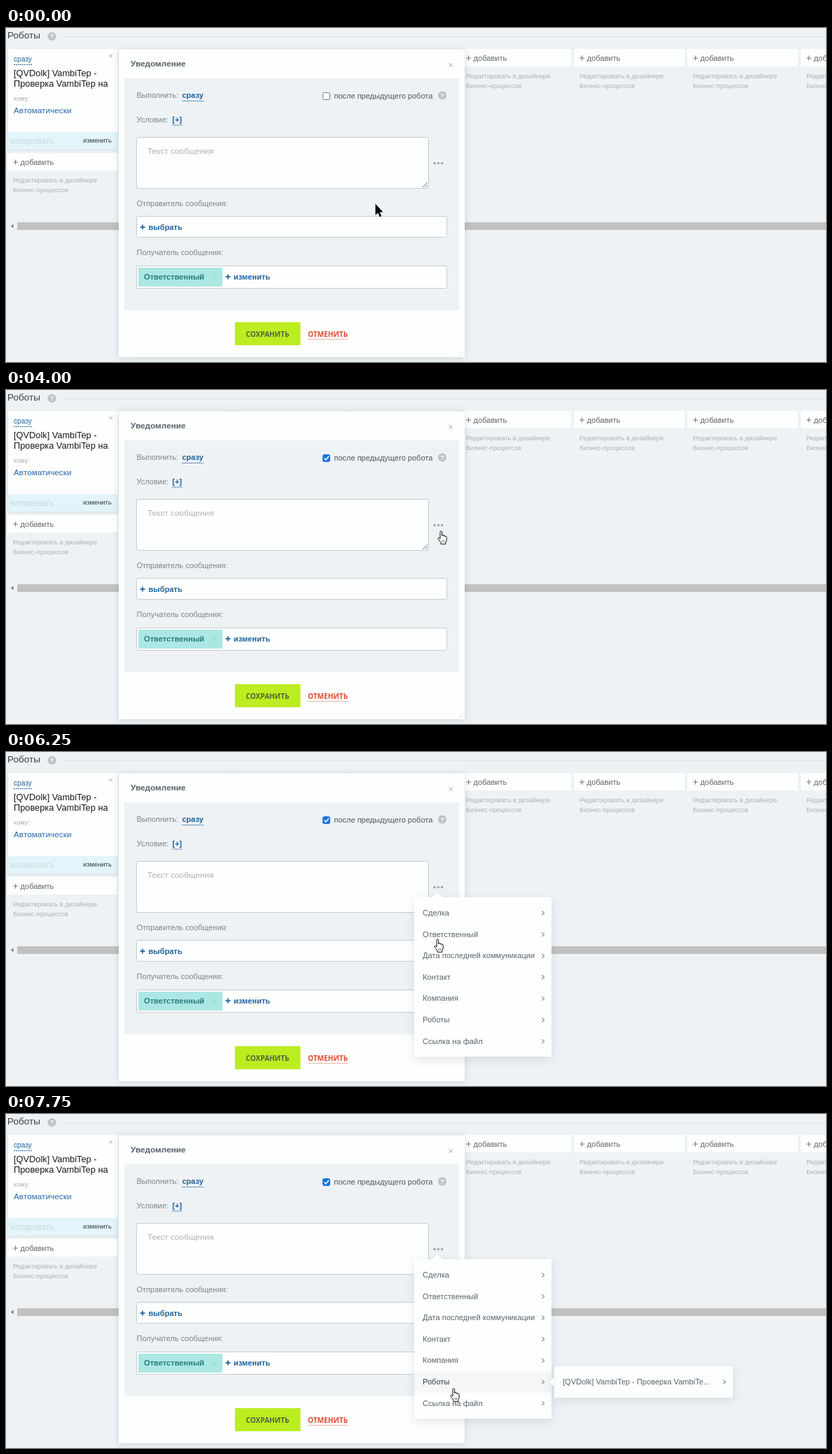
An HTML page with a canvas that plays this animation: 1171 by 478 pixels, repeating every 8 s.

```html
<!DOCTYPE html>
<html lang="ru">
<head>
<meta charset="utf-8">
<title>Роботы</title>
<style>
  html, body { margin: 0; width: 100%; height: 100%; overflow: hidden; background: #eef2f5; }
  canvas { display: block; }
</style>
</head>
<body>
<canvas id="stage" width="1171" height="478"></canvas>
<script>
const ctx = document.getElementById('stage').getContext('2d');
const LOOP = 8000;
const ARIAL = '"Liberation Sans", Arial, sans-serif';
const OPEN = '"Open Sans", sans-serif';
const BG = '#eef2f5', WHITE = '#fdfefe', MUTED = '#7d838a', LINK = '#1e629f', PALE = '#abb1b9';
const ITEM = '#5c646d';
const ITEMS = ['Сделка', 'Ответственный', 'Дата последней коммуникации', 'Контакт',
  'Компания', 'Роботы', 'Ссылка на файл'];

// start time, pointer kind, left, top
const POINTER = [
  [0, 'arrow', 527, 251], [250, 'beam', 511, 193], [500, 'arrow', 456, 138],
  [750, 'arrow', 448, 95], [1000, 'arrow', 455, 99], [1250, 'arrow', 456, 98],
  [3000, 'arrow', 488, 133], [3250, 'beam', 545, 163], [3500, 'hand', 600, 190],
  [3750, 'hand', 610, 203], [4000, 'hand', 616, 201], [4750, 'arrow', 611, 198],
  [6250, 'hand', 611, 267], [6500, 'hand', 620, 335], [6750, 'hand', 631, 391],
  [7750, 'hand', 634, 392]
];
// start time, then pairs of row and strength
const HOVER = [[0], [6500, 3, 0.6], [6750, 4, 0.5, 5, 0.4], [7000, 5, 1]];

const ARROW = new Path2D('M.5 .5V17L4.3 13.4 6.7 19.4 9.2 18.4 6.8 12.5H11.5Z');
const HAND = new Path2D('M4 12V2.2a1.3 1.3 0 0 1 2.6 0V7.6a1.2 1.2 0 0 1 2.4 0V8.3' +
  'a1.1 1.1 0 0 1 2.2 .2V9.2a1 1 0 0 1 2 .3V14L11.8 17V19.4H5V17.3L1 12a1.2 1.2 0 0 1 1.6-1.6Z');

function rect(x, y, w, h, fill) {
  ctx.fillStyle = fill;
  ctx.fillRect(x, y, w, h);
}

function box(x, y, w, h, fill, stroke, r = 2) {
  ctx.beginPath();
  ctx.roundRect(x + 0.5, y + 0.5, w - 1, h - 1, r);
  ctx.fillStyle = fill;
  ctx.fill();
  ctx.lineWidth = 1;
  ctx.strokeStyle = stroke;
  ctx.stroke();
}

function text(s, x, y, size, color, weight = 400, family = ARIAL) {
  ctx.font = `${weight} ${size}px ${family}`;
  ctx.fillStyle = color;
  ctx.fillText(s, x, y);
}

function line(points, color, width = 1, dash = []) {
  ctx.beginPath();
  for (let i = 0; i < points.length; i += 2) ctx.lineTo(points[i], points[i + 1]);
  ctx.strokeStyle = color;
  ctx.lineWidth = width;
  ctx.setLineDash(dash);
  ctx.stroke();
  ctx.setLineDash([]);
}

function disc(x, y, r, fill) {
  ctx.beginPath();
  ctx.arc(x, y, r, 0, 7);
  ctx.fillStyle = fill;
  ctx.fill();
}

function cross(x, y, r, color, width = 1) {
  line([x - r, y - r, x + r, y + r], color, width);
  line([x - r, y + r, x + r, y - r], color, width);
}

function plus(x, y, color, width) {
  line([x - 3.5, y, x + 3.5, y], color, width);
  line([x, y - 3.5, x, y + 3.5], color, width);
}

function help(x, y) {
  disc(x, y, 6, '#bcc2c7');
  text('?', x - 2.7, y + 3.3, 9, '#fff', 700);
}

function dashed(s, x, y, size, weight, width) {
  text(s, x, y, size, LINK, weight);
  line([x, y + 4.5, x + width, y + 4.5], LINK, 1, [2, 1]);
}

function raised(alpha, blur, dy, draw) {
  ctx.save();
  ctx.shadowColor = `rgba(70,85,105,${alpha})`;
  ctx.shadowBlur = blur;
  ctx.shadowOffsetY = dy;
  draw();
  ctx.restore();
}

function addBar(x, y) {
  rect(x, y, 158, 25, WHITE);
  plus(x + 11.5, y + 13, '#73797f', 1);
  text('добавить', x + 18.5, y + 16.5, 11.1, '#5f656c');
  text('Редактировать в дизайнере', x + 8, y + 42, 9.3, PALE);
  text('Бизнес-процессов', x + 8, y + 55.5, 9.3, PALE);
}

function page() {
  rect(0, 0, 1171, 478, BG);
  text('Роботы', 2, 15, 13.6, '#3c4249');
  help(65.5, 12);
  line([79, 12.5, 1171, 12.5], '#dce1e6');

  for (let i = 1; i < 8; i++) addBar(1 + 162 * i, 30);
  addBar(2, 179);

  raised(0.14, 3, 1, () => rect(3, 30, 157, 144, WHITE));
  rect(3, 149, 157, 25, '#e3f4fb');
  cross(149.5, 40, 2.5, '#a3a9ae');
  dashed('сразу', 11, 48, 10.1, 400, 26);
  text('[QVDolk] VambiTep -', 11, 69, 12.8, '#16191c');
  text('Проверка VambiTep на', 11, 84, 12.8, '#16191c');
  text('кому:', 11, 104, 9.3, '#aab0b5');
  text('Автоматически', 11, 122, 11.8, '#2868ae');
  text('копировать', 6, 166, 11.9, '#c7d9e1');
  text('изменить', 110, 164, 9.4, '#343a40');

  rect(16, 278, 1155, 11, '#c1c1c1');
  ctx.beginPath();
  ctx.moveTo(7, 283.5);
  ctx.lineTo(10.5, 280.5);
  ctx.lineTo(10.5, 286.5);
  ctx.fillStyle = '#777';
  ctx.fill();
}

function checkbox(on) {
  box(452, 92, 11, 11, on ? '#1873e0' : '#fff', on ? '#1873e0' : '#747474');
  if (on) line([454.5, 97.5, 456.8, 100, 461, 94.8], '#fff', 1.5);
}

function dialog(checked, grip) {
  raised(0.2, 10, 1, () => rect(161, 31, 494, 440, WHITE));
  text('Уведомление', 178, 55, 11.8, '#59616b', 700);
  cross(635, 53, 2.7, '#a6acb2');
  rect(169, 72, 478, 332, BG);

  text('Выполнить:', 186.5, 100, 11, MUTED);
  dashed('сразу', 251.5, 100, 11, 700, 31);
  checkbox(checked);
  text('после предыдущего робота', 468.5, 100.5, 11, '#4d555d');
  help(623, 96.5);
  text('Условие:', 186.5, 134.5, 11, MUTED);
  dashed('[+]', 237.5, 134.5, 11, 700, 14);

  const edge = '#c5ccd2';
  box(186, 156, 418, 74, WHITE, edge);
  text('Текст сообщения', 202, 180, 11.8, '#adb1b6');
  line([595, 228, 602, 221], '#777');
  line([599, 228, 602, 225], '#777');
  for (let i = 0; i < 3; i++) disc(612 + 5.3 * i, 193.5, 1.8, '#a0a7ae');

  text('Отправитель сообщения:', 186.5, 254.5, 11, MUTED);
  box(186, 269, 444, 31, WHITE, edge);
  plus(195, 285, LINK, 1.7);
  text('выбрать', 203.5, 288.5, 11.1, LINK, 700);

  text('Получатель сообщения:', 186.5, 325, 11, MUTED);
  box(186, 340, 444, 33, WHITE, edge);
  rect(189, 343, 120, 27, '#ace7e3');
  text('Ответственный', 197, 360, 11.1, '#277d7c', 700);
  cross(296.5, 356.5, 2, '#8bcfd4');
  plus(317, 356, LINK, 1.7);
  text('изменить', 325, 359.5, 11.1, LINK, 700);

  rect(327, 421, 93.5, 33, '#bbed21');
  text('СОХРАНИТЬ', 342.5, 441.5, 10.1, '#55613f', 700, OPEN);
  text('ОТМЕНИТЬ', 431, 441.5, 10.1, '#df4a30', 700, OPEN);
  line([431, 445.5, 489, 445.5], '#efb3a8');

  if (grip) {
    line([646, 469, 653, 462], '#c3c8cd', 1, [1, 1]);
    line([649, 469, 653, 465], '#c3c8cd', 1, [1, 1]);
  }
}

function panel(x, y, w, h, notch) {
  raised(0.15, 14, 4, () => {
    ctx.beginPath();
    ctx.rect(x, y, w, h);
    ctx.moveTo(...notch[0]);
    ctx.lineTo(...notch[1]);
    ctx.lineTo(...notch[2]);
    ctx.fillStyle = WHITE;
    ctx.fill();
  });
}

function chevron(x, y) {
  line([x - 1.7, y - 3, x + 1.5, y, x - 1.7, y + 3], '#8b929a', 1.2);
}

function menu(hover) {
  panel(583, 208, 196, 228, [[608, 208.5], [616, 201], [624, 208.5]]);
  const strength = {};
  for (let i = 1; i < hover.length; i += 2) strength[hover[i]] = hover[i + 1];
  ITEMS.forEach((item, i) => {
    const y = 230 + 30.6 * i, k = strength[i] || 0;
    if (k) rect(583, Math.round(y - 15), 196, 31, `rgba(245,247,248,${k})`);
    text(item, 595, y + 4, 11.1, k === 1 ? '#363c43' : ITEM);
    chevron(767, y + 0.5);
  });
}

function submenu() {
  panel(783, 361, 255, 45, [[783.5, 376], [776, 383.5], [783.5, 391]]);
  text('[QVDolk] VambiTep - Проверка VambiTe...', 795, 387, 11.1, ITEM);
  chevron(1026, 383.5);
}

function pointer([, kind, x, y]) {
  ctx.save();
  ctx.translate(x, y);
  ctx.lineJoin = 'round';
  ctx.lineWidth = 1;
  if (kind === 'arrow') {
    ctx.lineWidth = 1.6;
    ctx.strokeStyle = '#fff';
    ctx.stroke(ARROW);
    ctx.fillStyle = '#000';
    ctx.fill(ARROW);
  } else if (kind === 'hand') {
    ctx.fillStyle = '#fff';
    ctx.fill(HAND);
    ctx.strokeStyle = '#111';
    ctx.stroke(HAND);
    line([7, 14, 7, 17], '#333', 0.8);
    line([9.3, 14, 9.3, 17], '#333', 0.8);
  } else {
    line([3.5, 1, 3.5, 16], '#111');
    line([0.5, 0.5, 3, 0.5, 3.5, 1.2, 4, 0.5, 6.5, 0.5], '#111');
    line([0.5, 16.5, 3, 16.5, 3.5, 15.8, 4, 16.5, 6.5, 16.5], '#111');
  }
  ctx.restore();
}

const at = (steps, t) => steps.findLast(s => s[0] <= t);

function frame() {
  const t = performance.now() % LOOP;
  page();
  dialog(t >= 2000, t < 4750);
  if (t >= 4750) menu(at(HOVER, t));
  if (t >= 7250) submenu();
  pointer(at(POINTER, t));
  requestAnimationFrame(frame);
}
frame();
</script>
</body>
</html>
```
